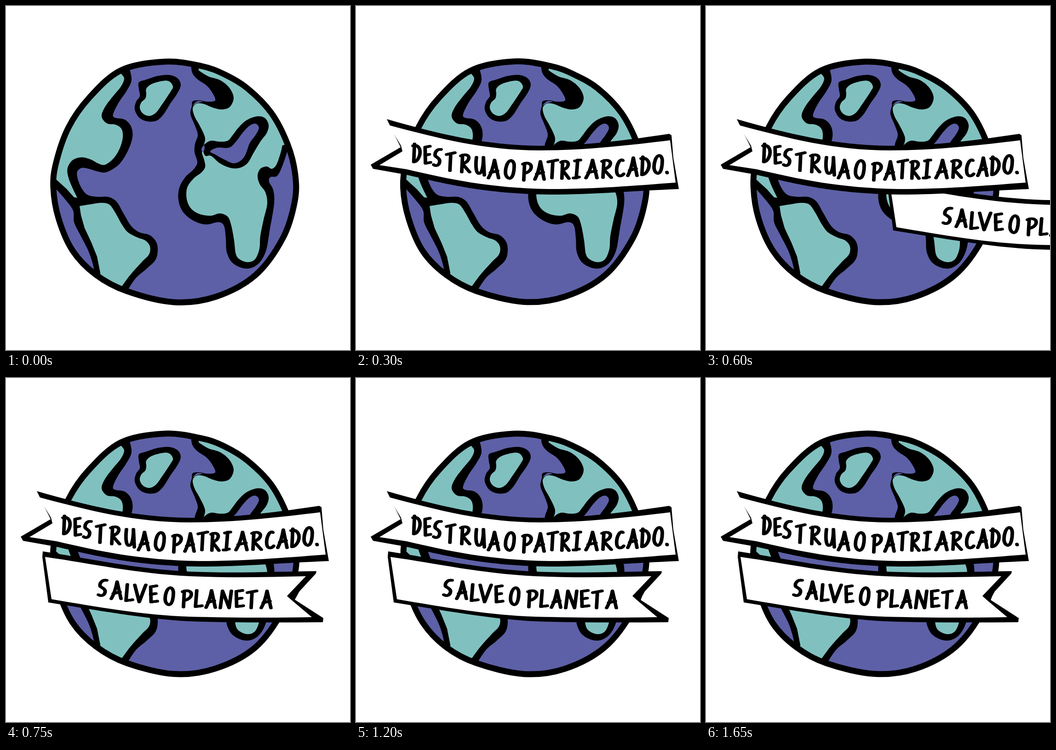
These frames come from a looping animation (748 px wide and 748 px high, 1.8 s). An HTML page with a canvas:

```html
<!DOCTYPE html>
<html lang="pt">
<head>
<meta charset="utf-8">
<title>Destrua o patriarcado. Salve o planeta</title>
<style>
html, body { margin: 0; width: 100%; height: 100%; overflow: hidden; background: #fff; }
canvas { display: block; }
</style>
</head>
<body>
<canvas id="stage" width="748" height="748" role="img" aria-label="Destrua o patriarcado. Salve o planeta"></canvas>
<script>
const ctx = document.getElementById('stage').getContext('2d');
const LOOP = 1800;
const SEA = '#5d60a6', LAND = '#80c1bf', INK = '#000', PAPER = '#fff';

const points = text => text.trim().split(/\s+/).map(p => p.split(',').map(Number));

// Smooth curve through points; an open one closes through straight tail points.
function curve(pts, tail) {
  const path = new Path2D(), n = pts.length, closed = !tail;
  const at = i => closed ? pts[(i + n) % n] : pts[Math.max(0, Math.min(n - 1, i))];
  path.moveTo(...pts[0]);
  for (let i = 0; i < (closed ? n : n - 1); i++) {
    const [a, b, c, d] = [at(i - 1), at(i), at(i + 1), at(i + 2)];
    path.bezierCurveTo(
      b[0] + (c[0] - a[0]) / 6, b[1] + (c[1] - a[1]) / 6,
      c[0] - (d[0] - b[0]) / 6, c[1] - (d[1] - b[1]) / 6, c[0], c[1]);
  }
  if (tail) points(tail).forEach(p => path.lineTo(...p));
  path.closePath();
  return path;
}
const shape = (text, tail) => curve(points(text), tail);

const rim = points(`345,121 425,131 475,149 525,179 577,232 612,300 629,365 628,425 602,505
  542,585 455,632 365,643.5 262,620 195,584 145,532 114,462 103,395 109,340 136,264 180,200 250,140`);

const layers = [
  // Americas
  [INK, shape(`266,128 273,160 262,185 245,210 233,235 237,243 258,247 272,262 275,285 265,315
    248,342 230,356 215,362 200,360 180,354 165,352 155,360 156,376 165,397 178,411 200,415
    222,415 240,425 255,450 272,478 290,492 312,498 326,512 330,530 325,552 305,572 282,592 262,622`,
    '262,700 40,700 40,90')],
  [LAND, shape(`251,148 257,158 250,175 232,197 215,220 208,240 219,255 238,258 251,267 254,285
    248,308 235,330 216,345 202,343 185,334 165,329 145,335 134,352 135,370 143,392 155,417`,
    '148,416 132,398 110,378 60,378 60,100 236,100')],
  [LAND, shape(`160,435 185,431 208,428 225,432 238,450 252,475 265,492 285,503 303,510 313,523
    311,540 295,557 270,585 250,612`,
    '245,640 205,610 205,580 198,545 186,515 171,483 163,455')],
  [SEA, shape('109,398 130,422 146,445 148,470 160,495 178,530 187,555 192,576',
    '180,590 90,480 90,398')],
  // northern island
  [INK, shape(`289,166 305,160 330,152 355,150 373,157 380,172 372,191 358,211 343,235 328,249
    308,251 290,243 280,225 283,208 291,196 289,181`)],
  [LAND, shape(`305,180 316,170 340,163 355,164 363,175 358,186 340,213 326,232 312,239 298,234
    291,222 294,210 303,201 305,191`)],
  // Europe, Africa, Asia
  [INK, shape(`402,125 405,145 416,159 435,172 447,186 455,205 437,208 420,205 406,207 404,218
    401,235 410,258 417,280 411,300 410,318 416,340 408,355 390,372 377,395 375,422 385,448
    408,467 435,475 462,470 474,478 478,505 480,535 492,558 515,570 535,569 553,556 566,530
    573,490 583,430 581,400 572,382 575,372 590,369 602,345 613,312`,
    '680,300 680,80 402,80')],
  [LAND, shape(`419,140 440,153 465,161 485,177 495,199 487,219 470,225 450,221 430,213 415,212
    406,222 410,240 420,258 430,278 433,290 430,303 426,318 431,335 433,350 425,362 408,375
    394,395 393,420 402,440 420,452 445,456 465,451 482,458 490,478 496,510 500,540 510,552
    527,557 542,550 551,528 553,500 560,465 568,430 564,405 552,388 547,370 553,354 567,349
    578,354 588,345 597,320 601,303`,
    '614,300 680,300 680,80 419,80')],
  [INK, shape(`430,303 445,293 465,295 482,293 492,282 505,265 522,249 545,240 562,243 571,258
    567,276 553,295 538,320 525,342 508,352 488,352 465,342 446,326 434,326 429,316`)],
  [SEA, shape(`444,316 460,308 485,308 500,295 515,275 530,260 543,256 550,265 543,280 530,298
    522,320 512,335 495,342 475,334 455,323`)],
  [SEA, shape('430,303 432,310 428,318 425,311')],
  [SEA, shape('406,216 416,207 427,208 416,211')]
];

// Brush letters in a 10 x 20 box
const glyphs = {
  D: 'M2 0L1 20M0 2C6 0 10 5 9.5 10C9 15 5 20 1 20',
  E: 'M1 1L1.5 19M1 1L9 0M1 10L8 9M1.5 19L10 18',
  S: 'M10 1C5 0 1 4 2 8C4 10 9 11 8 15C7 19 3 20 0 18',
  T: 'M0 2L10 0M5 1L4 20',
  R: 'M2 1L1 20M0 2C6 -1 10 2 9 5C8 9 4 10 2 11L10 20',
  U: 'M1 0C0 8 0 18 4 18C8 18 9 8 9 0L10 20',
  A: 'M0 20C3 14 5 6 6 0L10 20M2 14L9 12',
  O: 'M6 0C2 1 0 8 0 13C0 18 3 20 5 20C9 19 10 11 10 6C10 2 8 0 6 0Z',
  P: 'M2 1L1 20M0 2C6 -1 10 2 10 5C10 9 5 12 2 12',
  C: 'M9 2C6 -1 1 6 1 13C1 21 7 20 10 17',
  I: 'M2 1L10 0M6 0L4 20M0 20L8 19',
  L: 'M2 0L0 19L10 18',
  V: 'M0 0L4 20C6 14 8 6 10 0',
  N: 'M0 20L2 0L8 20L10 0',
  '.': 'M4 17L5 18'
};

// Each item: letter, left, top, width
function lettering(text, height) {
  const path = new Path2D();
  for (const item of text.trim().split(/\s+/)) {
    const [ch, x, y, w] = item.split(',');
    const box = new DOMMatrix([(w - 8) / 10, 0, 0, (height - 6) / 20, +x + 4, +y + 3]);
    path.addPath(new Path2D(glyphs[ch]), box);
  }
  return path;
}

const upper = {
  edge: new Path2D(`M67 246C180 278 280 303 400 304C500 304 600 290 681 278L686 281
    L690 330L702 398C600 402 520 410 420 410C280 408 200 388 110 367L37 354L32 345L97 307Z`),
  paper: new Path2D(`M71 259C180 288 280 314 400 314C500 314 600 302 683 292L695 384
    C600 391 520 398 420 398C290 396 200 376 110 355L51 346L101 316L98 304Z`),
  text: lettering(`D,120,297,24 E,145,302,21 S,165,307,24 T,193,316,26 R,224,319,27 U,256,326,27
    A,284,332,30 O,321,333,27 P,359,337,26 A,385,335,28 T,414,332,28 R,442,333,25 I,469,332,23
    A,496,332,32 R,531,331,28 C,561,329,25 A,587,327,28 D,616,325,26 O,644,322,26 .,670,325,13`, 45)
};

const lower = {
  edge: new Path2D(`M70 377C180 394 270 415 390 421C480 425 580 421 665 420L664 425L628 464
    L618 482L680 522L679 531C580 532 480 532 390 529C290 524 190 505 82 488L69 389Z`),
  paper: new Path2D(`M75 389C180 404 270 425 390 431C480 435 560 433 642 431L601 474L611 483
    L655 520C560 522 470 521 390 519C290 516 190 498 89 481Z`),
  text: lettering(`S,187,435,26 A,215,440,29 L,247,446,22 V,266,447,32 E,299,449,24 O,332,453,26
    P,370,458,27 L,398,459,22 A,421,459,28 N,452,460,32 E,485,459,25 T,511,460,28 A,541,460,29`, 43)
};

function fill(path, color) {
  ctx.fillStyle = color;
  ctx.fill(path);
}

function drawBanner(banner, dx) {
  ctx.save();
  ctx.translate(dx, 0);
  fill(banner.edge, INK);
  fill(banner.paper, PAPER);
  ctx.lineWidth = 5.4;
  for (const nib of [-1.2, 0, 1.2]) {
    ctx.save();
    ctx.translate(nib, 0);
    ctx.stroke(banner.text);
    ctx.restore();
  }
  ctx.restore();
}

function noise(seed) {
  const v = Math.sin(seed * 12.9898) * 43758.5453;
  return v - Math.floor(v) - 0.5;
}

function drawGlobe(tick) {
  const wobble = rim.map(([x, y], i) =>
    [x + noise(tick * 50 + i + 1), y + noise(tick * 50 + i + 26)]);
  const outline = curve(wobble);
  ctx.save();
  ctx.clip(outline);
  fill(outline, SEA);
  for (const [color, path] of layers) fill(path, color);
  ctx.restore();
  ctx.lineWidth = 13;
  ctx.stroke(outline);
}

// Remaining distance of a banner, eased out cubically
const slide = step => Math.round(Math.max(0, 6.875 - 2.36 * step) ** 3);

function draw(t) {
  // every 150 ms splits into holds of 90 and 60
  const tick = 2 * Math.floor(t / 150) + (t % 150 >= 90 ? 1 : 0);
  fill(new Path2D('M0 0H748V748H0Z'), PAPER);
  ctx.strokeStyle = INK;
  ctx.lineCap = ctx.lineJoin = 'round';
  drawGlobe(tick > 10 ? tick >> 1 : tick);
  drawBanner(lower, slide(tick - 8));
  drawBanner(upper, -slide(tick - 1));
}

let start;
function frame(now) {
  start ??= now;
  draw((now - start) % LOOP);
  requestAnimationFrame(frame);
}
draw(0);
requestAnimationFrame(frame);
</script>
</body>
</html>
```
